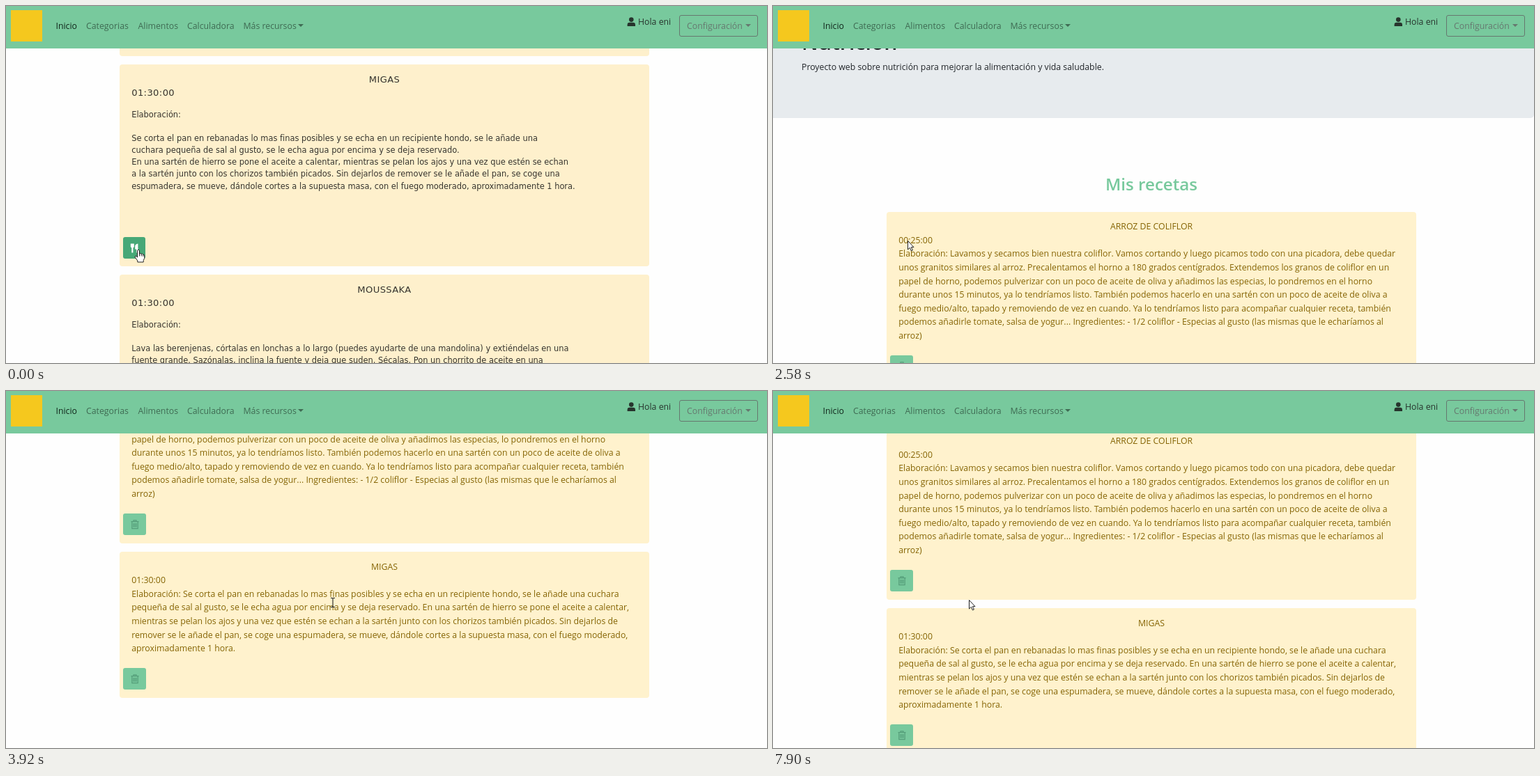
An HTML page for the animation above (8 s loop, 1092 by 513 pixels).

```html
<!DOCTYPE html>
<html lang="es">
<head>
<meta charset="utf-8">
<title>Mis recetas</title>
<style>
html, body { margin: 0; width: 100%; height: 100%; overflow: hidden; background: #fefefe; }
#stage { position: relative; width: 1092px; height: 513px; overflow: hidden; background: #fefefe;
  font: 12.3px/19.6px "Open Sans", "Noto Sans", sans-serif; }
#stage div, #stage svg { position: absolute; }
.page { left: 0; top: 0; width: 1092px; height: 921px; }
.t { white-space: pre; }
.mid { left: 163px; width: 760px; text-align: center; }
.card { left: 163px; width: 760px; border-radius: 4px; background: #fff2cd; color: #856404; }
.btn { left: 5px; width: 33px; height: 31px; border-radius: 3px; background: #78c99d; }
#list .card { background: #fef0cc; color: #37352f; font: 11.42px/17.14px "DejaVu Sans", Verdana, sans-serif; }
#list .head { font-size: 13.07px; line-height: 19.6px; letter-spacing: .4px; }
#list .btn { background: #47a877; width: 32px; }
#hero { left: 0; top: 61px; width: 1092px; height: 181px; background: #e7ebee; border-radius: 0 0 5px 0; color: #212529; }
h1, h2 { position: absolute; margin: 0; font-weight: 600; white-space: pre; }
h1 { left: 41px; top: 52px; font-size: 30.3px; line-height: 40px; }
h2 { top: 317px; font-size: 24.2px; line-height: 40px; color: #78c99d; }
#nav { left: 0; top: 0; width: 1092px; height: 61px; background: #78c99d; }
#nav .t { top: 18.6px; color: #3f6b53; }
.caret { border: 4px solid transparent; border-top-color: currentColor; border-bottom: 0; }
#logo { left: 7px; top: 6px; width: 45px; height: 45px; background: #f5c81e; }
#conf { left: 966px; top: 13px; width: 111px; height: 29px; border: 1px solid #66786f; border-radius: 3px; color: #66786f; }
#nav #conf .t { left: 10px; top: 4.6px; color: inherit; }
#mouse { left: 0; top: 0; overflow: visible; }
</style>
</head>
<body>
<div id="stage">
  <div class="page" id="list"></div>
  <div class="page" id="mine">
    <div id="hero">
      <h1>Nutrición</h1>
      <div class="t" style="left:41px;top:97.6px">Proyecto web sobre nutrición para mejorar la alimentación y vida saludable.</div>
    </div>
    <h2 class="mid">Mis recetas</h2>
  </div>
  <div id="nav">
    <div id="logo"></div>
    <div class="t" style="left:71.5px;color:#10251a">Inicio</div>
    <div class="t" style="left:115px">Categorias</div>
    <div class="t" style="left:189.5px">Alimentos</div>
    <div class="t" style="left:260px">Calculadora</div>
    <div class="t" style="left:340.5px">Más recursos</div>
    <div class="caret" style="left:419px;top:26px;color:#3f6b53"></div>
    <svg style="left:891px;top:16px" width="13" height="14" fill="#27342d"><circle cx="6.3" cy="3.6" r="3.3"/><path d="M.6 13V11Q.6 7.8 3.6 7.8H9Q12 7.8 12 11V13Z"/></svg>
    <div class="t" style="left:907px;top:13px;color:#27342d">Hola eni</div>
    <div id="conf"><div class="t">Configuración</div><div class="caret" style="left:94px;top:12px"></div></div>
  </div>
  <svg id="mouse" width="20" height="22">
    <path id="arrow" d="M.5.5V13L3.4 10.3 5.4 14.9 7.4 14 5.4 9.6H9Z" fill="#fff" stroke="#222" stroke-width="1"/>
    <path id="beam" d="M-3-6.5H-1Q0-6.5 0-5.5Q0-6.5 1-6.5H3M0-5.5V5.5M-3 6.5H-1Q0 6.5 0 5.5Q0 6.5 1 6.5H3" fill="none" stroke="#222" stroke-width="1.1"/>
    <path id="hand" d="M-1.5 1.2Q0-.6 1.5 1.2V6Q3 5 4.2 6.3Q5.8 5.6 6.7 7Q8.7 6.6 8.7 9V12.5L7.2 15.5V18H-1.2V16L-4.6 11.4Q-5.4 9.4-3.6 9.2L-1.5 11ZM1.5 6V9.5M4.2 6.5V9.5M6.7 7.2V9.8" fill="#fff" stroke="#222" stroke-width="1"/>
  </svg>
</div>
<script>
const $ = id => document.getElementById(id);
const trash = `<svg style="left:10.5px;top:9px" width="12" height="14" fill="none" stroke="#559e7a" stroke-width="1.2">
  <path d="M.5 2.6H11.5M4 2.3V.8H8V2.3M1.8 3V12.6H10.2V3M4 5V10.8M6 5V10.8M8 5V10.8"/></svg>`;
const fork = `<svg style="left:10px;top:9px" width="13" height="14" fill="#fff">
  <path d="M.8.5H5.8V4.5Q5.8 6 4.4 6.6V13.5H2.3V6.6Q.8 6 .8 4.5ZM7.2 8.5V4Q7.4 1 11.4.5V13.5H9.2V8.5Z"/></svg>`;

function text(x, y, lines, cls = "") {
  return `<div class="t ${cls}" style="left:${x}px;top:${y}px">${lines}</div>`;
}
function card(page, top, height, title, time, body, bodyTop, icon, btnTop) {
  page.insertAdjacentHTML("beforeend", `<div class="card" style="top:${top}px;height:${height}px">
    <div class="t head" style="left:0;width:100%;text-align:center;top:11.7px">${title}</div>
    ${text(17.2, 31.3, time, "head")}${text(17.2, bodyTop, body)}
    <div class="btn" style="top:${btnTop}px">${icon}</div></div>`);
}

card($("list"), -200, 272, "", "", "", 60, fork, 230);
card($("list"), 84, 290, "MIGAS", "01:30:00", `Elaboración:

Se corta el pan en rebanadas lo mas finas posibles y se echa en un recipiente hondo, se le añade una
cuchara pequeña de sal al gusto, se le echa agua por encima y se deja reservado.
En una sartén de hierro se pone el aceite a calentar, mientras se pelan los ajos y una vez que estén se echan
a la sartén junto con los chorizos también picados. Sin dejarlos de remover se le añade el pan, se coge una
espumadera, se mueve, dándole cortes a la supuesta masa, con el fuego moderado, aproximadamente 1 hora.`, 63.7, fork, 248);
card($("list"), 386, 290, "MOUSSAKA", "01:30:00", `Elaboración:

Lava las berenjenas, córtalas en lonchas a lo largo (puedes ayudarte de una mandolina) y extiéndelas en una
fuente grande. Sazónalas, inclina la fuente y deja que suden. Sécalas. Pon un chorrito de aceite en una`, 63.7, fork, 248);

card($("mine"), 376.5, 249, "ARROZ DE COLIFLOR", "00:25:00",
`Elaboración: Lavamos y secamos bien nuestra coliflor. Vamos cortando y luego picamos todo con una picadora, debe quedar
unos granitos similares al arroz. Precalentamos el horno a 180 grados centígrados. Extendemos los granos de coliflor en un
papel de horno, podemos pulverizar con un poco de aceite de oliva y añadimos las especias, lo pondremos en el horno
durante unos 15 minutos, ya lo tendríamos listo. También podemos hacerlo en una sartén con un poco de aceite de oliva a
fuego medio/alto, tapado y removiendo de vez en cuando. Ya lo tendríamos listo para acompañar cualquier receta, también
podemos añadirle tomate, salsa de yogur... Ingredientes: - 1/2 coliflor - Especias al gusto (las mismas que le echaríamos al
arroz)`, 50.9, trash, 206.5);
card($("mine"), 638, 209.5, "MIGAS", "01:30:00",
`Elaboración: Se corta el pan en rebanadas lo mas finas posibles y se echa en un recipiente hondo, se le añade una cuchara
pequeña de sal al gusto, se le echa agua por encima y se deja reservado. En una sartén de hierro se pone el aceite a calentar,
mientras se pelan los ajos y una vez que estén se echan a la sartén junto con los chorizos también picados. Sin dejarlos de
remover se le añade el pan, se coge una espumadera, se mueve, dándole cortes a la supuesta masa, con el fuego moderado,
aproximadamente 1 hora.`, 50.9, trash, 167);

const LOOP = 8000, SWITCH = 870;
// [ms, scroll offset]
const scroll = [[0, 0], [2430, 42], [2580, 81], [2700, 104], [2850, 150], [3000, 186], [3130, 244],
  [3280, 326], [3420, 391], [3540, 407], [6590, 398], [6710, 362], [6830, 336], [6960, 326]];
// [ms, x, y, shape]
const mouse = [[0, 190, 350, "hand"], [1880, 193, 346, "arrow"], [2030, 193, 343, "arrow"],
  [2580, 193, 337, "arrow"], [2850, 194, 328, "beam"], [3000, 194, 323, "beam"],
  [3540, 206, 322, "beam"], [3660, 275, 316, "beam"], [3800, 385, 309, "beam"], [3920, 469, 304, "beam"],
  [4070, 520, 292, "beam"], [4210, 546, 274, "beam"], [4350, 558, 263, "beam"], [4500, 562, 258, "beam"],
  [4650, 562, 252, "beam"], [5500, 564, 263, "beam"], [5640, 570, 288, "beam"], [5780, 576, 313, "beam"],
  [5900, 573, 325, "beam"], [6020, 568, 331, "beam"], [6170, 543, 346, "beam"], [6310, 500, 344, "beam"],
  [6450, 463, 337, "beam"], [6710, 447, 325, "beam"], [7260, 430, 322, "beam"], [7400, 385, 315, "beam"],
  [7560, 335, 307, "arrow"], [7720, 298, 302, "arrow"], [7900, 281, 300, "arrow"]];
const at = (rows, t) => rows.findLast(r => r[0] <= t);

const start = performance.now();
function draw() {
  const t = (performance.now() - start) % LOOP;
  const [, x, y, shape] = at(mouse, t);
  $("list").style.display = t < SWITCH ? "" : "none";
  $("mine").style.display = t < SWITCH ? "none" : "";
  $("mine").style.top = -at(scroll, t)[1] + "px";
  $("mouse").style.transform = `translate(${x}px, ${y}px)`;
  for (const id of ["arrow", "beam", "hand"]) $(id).style.display = id === shape ? "" : "none";
  requestAnimationFrame(draw);
}
draw();
</script>
</body>
</html>
```
